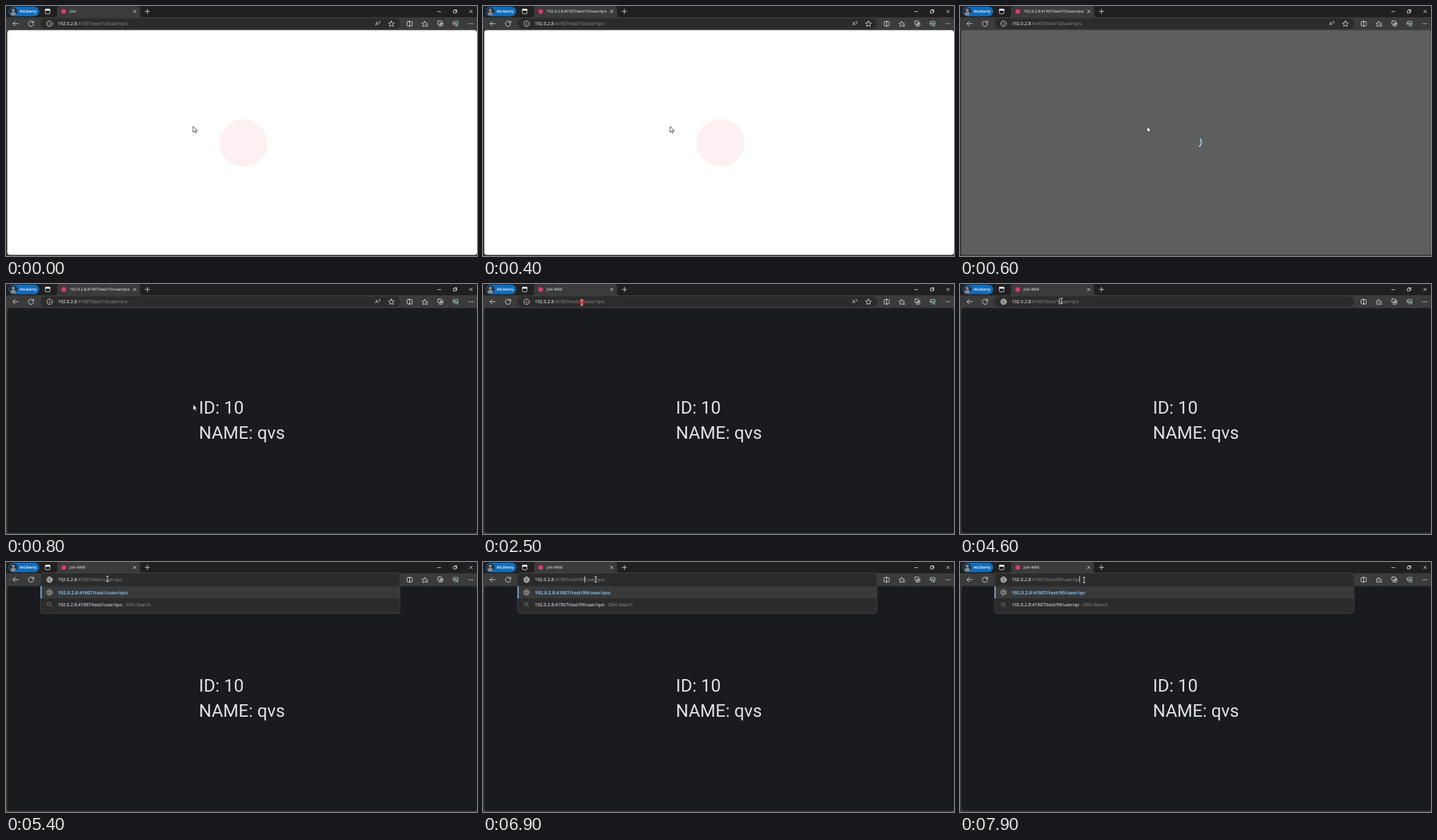
Write an HTML page that moves like this. It is 710 px wide and 378 px high and loops after 8 s.

```html
<!DOCTYPE html>
<html lang="en">
<head>
<meta charset="utf-8">
<style>
  html, body { margin: 0; width: 100%; height: 100%; overflow: hidden; background: #3b3b3b; }
  svg { display: block; width: 100%; height: 100%; }
  text { font-family: "Open Sans", "Noto Sans", sans-serif; fill: #fff; text-rendering: geometricPrecision; white-space: pre; }
  .line { fill: none; stroke: #e4e4e4; stroke-width: .85; stroke-linecap: round; stroke-linejoin: round; }
  .dim { stroke: #a8a8a8; }
  .small { font-size: 5.9px; }
  .url { font-size: 6.85px; }
  .grey { fill: #969696; }
  .big { font: 26.6px Roboto, sans-serif; fill: #e2e2e6; }
</style>
</head>
<body>
<svg viewBox="0 0 710 378">
  <defs>
    <g id="globe" class="line">
      <circle r="4.1"/><ellipse rx="1.8" ry="4.1"/><path d="M-3.8-1.4H3.8M-3.8 1.4H3.8"/>
    </g>
    <path id="star" class="line" d="M0-4.2 1.3-1.4 4.3-1 2.1 1.1 2.7 4.1 0 2.6-2.7 4.1-2.1 1.1-4.3-1-1.3-1.4Z"/>
    <path id="cross" class="line" d="M-2-2 2 2M2-2-2 2"/>
  </defs>

  <!-- Window frame and tab strip -->
  <path fill="#3b3b3b" d="M0 0H710V378H0Z"/>
  <path fill="#202020" d="M0 0H710V17H0Z"/>
  <path fill="#3b3b3b" d="M73 17Q77 17 77 13V4Q77 0 81 0H198Q202 0 202 4V13Q202 17 206 17Z"/>
  <rect x="4" y="1" width="46" height="14.5" rx="7.2" fill="#0f6cbd"/>
  <circle cx="11" cy="8.2" r="6.2" fill="#26313c"/>
  <path fill="#8d8a88" d="M7 13Q7 8.8 11 8.8T15 13Q11 15.6 7 13Z"/>
  <circle cx="11" cy="6.2" r="2.3" fill="#8d8a88"/>
  <text x="20.5" y="10.2" font-size="5.8" font-weight="600">AtLiberty</text>
  <rect class="line" x="59.3" y="4.8" width="7" height="7" rx="1.2"/>
  <path fill="#fff" d="M59 4.5H66.6V7H59Z"/>
  <circle cx="87" cy="8.2" r="3.5" fill="#e0386e"/>
  <text id="title" class="small" x="96" y="10.3"></text>
  <use href="#cross" x="194" y="8.3"/>
  <path class="line" d="M209.8 8.2H216.6M213.2 4.8V11.6M650.7 8.5H655.3"/>
  <path class="line" d="M674.8 6.8H678.4V10.6H674.8ZM676 5.6H679.6V9.4"/>
  <use href="#cross" x="701" y="8.3"/>

  <!-- Toolbar -->
  <path class="line" d="M18.5 26.7H10.7M14 23.2 10.5 26.7 14 30.2"/>
  <path class="line" d="M41.3 25A4 4 0 1 0 41.7 27.3M41.7 22.6V25.3H39"/>
  <rect x="52" y="18.7" width="542" height="16" rx="7" fill="#2b2b2b"/>
  <g id="barIcons">
    <text x="556.5" y="29.3" font-size="7" fill="#b0b0b0">A</text>
    <path class="line dim" d="M561.8 23.5Q563 24.7 561.8 26M563.3 22.6Q565 24.7 563.3 26.8"/>
    <g class="dim"><use href="#star" x="581" y="26.8"/></g>
  </g>
  <rect class="line" x="604.6" y="23.5" width="7.8" height="6.6" rx="1.2"/>
  <path class="line" d="M608.5 22.5V31"/>
  <path class="line" d="M630.5 30.3 628.5 31 629 28 627 26 629.8 25.6 631 23 632.2 25.6 635 26M632 28.2H635.8M632 30.5H635.8"/>
  <rect class="line" x="651" y="22.6" width="5.8" height="5.8" rx="1.2"/>
  <path class="line" d="M658.5 25V28.6Q658.5 30.5 656.5 30.5H653M655.2 25.4V28.6M653.6 27H656.8"/>
  <path class="line" d="M677.7 30.5 674.3 27Q672.8 24.5 675 23.2 676.6 22.7 677.7 24.2 678.8 22.7 680.5 23.2 682.5 24.5 681 27M674 27H676.3L677.3 25.5 678.5 28 679.2 27H681"/>
  <circle cx="680" cy="29.3" r="1.9" fill="#3fa36c"/>
  <g fill="#e4e4e4"><circle cx="697.8" cy="26.8" r=".75"/><circle cx="700.6" cy="26.8" r=".75"/><circle cx="703.4" cy="26.8" r=".75"/></g>

  <!-- Page -->
  <rect id="page" x="2" y="36.6" width="708" height="339.6" rx="4"/>
  <circle id="splash" cx="358" cy="207" r="36" fill="#fdf0f2"/>
  <path id="spinner" d="M361.6 200.2A9 9 0 0 1 360.4 213" fill="none" stroke="#9ecaff" stroke-width="1.8"/>
  <g id="content">
    <text class="big" x="290.8" y="196.2">ID: 10</text>
    <text class="big" x="290.8" y="233.8">NAME: qvs</text>
  </g>

  <!-- Suggestions -->
  <g id="popup">
    <rect x="51" y="17" width="544" height="63" rx="5" fill="#000" opacity=".25"/>
    <rect x="52" y="16.5" width="542" height="61.5" rx="4" fill="#2b2b2b" stroke="#4c4c4c" stroke-width=".8"/>
    <path fill="#393939" d="M52 36.8H594V55H52Z"/>
    <path fill="#6cb2ee" d="M52 36.8H53.8V55H52Z"/>
    <g opacity=".6"><use href="#globe" x="65.6" y="46"/></g>
    <g class="line dim" opacity=".7"><circle cx="64.8" cy="63.8" r="2.6"/><path d="M66.8 65.8 69 68"/></g>
    <text id="match" x="78" y="48.6" font-size="7.1" font-weight="700" style="fill:#7db9ee"></text>
    <text class="url" x="78" y="67.4"><tspan id="query"></tspan><tspan class="grey"> - Zilm Search</tspan></text>
  </g>

  <!-- Address -->
  <use id="globeIcon" href="#globe" x="65.8" y="26.8"/>
  <g id="infoIcon" class="line"><circle cx="65.8" cy="26.8" r="4.1"/><path d="M65.8 26.4V28.8M65.8 24.7V24.8"/></g>
  <rect id="selection" x="78" y="21.5" height="10" fill="#2563a8"/>
  <text id="address" class="url" x="78" y="29.1"><tspan>192.0.2.8</tspan><tspan id="path" class="grey"></tspan></text>
  <rect id="caret" y="21.5" width=".8" height="9.8" fill="#eee"/>

  <!-- Pointer -->
  <g id="pointer">
    <circle id="press" r="4.6" fill="#d32020" opacity=".65"/>
    <path id="arrow" d="M0 0V9L2.1 7.1 3.6 10.2 5 9.5 3.6 6.6H6.3Z" fill="#fff" stroke="#111" stroke-width=".7"/>
    <path id="beam" class="line" d="M-1.6-4H1.6M0-4V4M-1.6 4H1.6"/>
  </g>
</svg>
<script>
const LOOP = 8000, STEP = 100, HOST = '192.0.2.8';
const el = id => document.getElementById(id);
const show = (id, on) => el(id).style.display = on ? '' : 'none';
const urlPath = (id, name) => `:41907/test/${id}/user/${name}`;

// time, id, name, caret position: after the id, at the end, or none
const edits = [
  [0, '10', 'qvs', ''],
  [3800, '10', 'qvs', 'id'],
  [4600, '1', 'qvs', 'id'],
  [4800, '', 'qvs', 'id'],
  [5600, '9', 'qvs', 'id'],
  [5800, '99', 'qvs', 'id'],
  [7300, '99', 'qvs', 'end'],
  [7700, '99', 'qv', 'end'],
];
// time, x, y
const moves = [
  [0, 282, 182], [1400, 282, 182], [2200, 149, 28], [3200, 149, 28],
  [3600, 153, 25.6], [6800, 153, 25.6], [7000, 187, 27.2], [LOOP, 187, 27.2],
];

function pointerAt(t) {
  const i = moves.findIndex(m => m[0] > t);
  const [t0, x0, y0] = moves[i - 1], [t1, x1, y1] = moves[i];
  const p = (t - t0) / (t1 - t0), k = p * p * (3 - 2 * p);
  return [x0 + (x1 - x0) * k, y0 + (y1 - y0) * k];
}

function render(now) {
  const t = Math.floor(now % LOOP / STEP) * STEP;
  const between = (a, b) => t >= a && t < b;

  const [since, id, name, caretAt] = edits.findLast(e => e[0] <= t);
  const path = urlPath(id, name), url = HOST + path;
  el('path').textContent = path;
  el('match').textContent = el('query').textContent = url;
  el('title').textContent = t < 100 ? 'Jolv' : t < 900 ? HOST + urlPath('10', 'qvs') : 'Jolv-Mild';

  el('page').setAttribute('fill', t < 600 ? '#fff' : t < 800 ? '#5d5f5e' : '#1a1b1e');
  show('splash', t < 600);
  show('spinner', between(600, 800));
  show('content', t >= 800);

  const editing = t >= 4600;
  show('barIcons', !editing);
  show('infoIcon', !editing);
  show('globeIcon', editing);
  show('popup', t >= 4700);

  const selected = between(2600, 3800);
  show('selection', selected);
  el('selection').setAttribute('width', el('address').getComputedTextLength());
  el('path').style.fill = selected ? '#fff' : '';

  const caretIndex = caretAt === 'id' ? url.indexOf('/user') : url.length;
  el('caret').setAttribute('x', 78 + el('address').getSubStringLength(0, caretIndex));
  show('caret', caretAt && (t - since) % 1100 < 600);

  const [x, y] = pointerAt(t), overText = y < 35;
  el('pointer').setAttribute('transform', `translate(${x} ${y})`);
  show('arrow', !overText);
  show('beam', overText);
  show('press', between(2400, 2700) || between(3700, 4000) || between(7200, 7500));
}

const start = performance.now();
function loop() {
  render(performance.now() - start);
  requestAnimationFrame(loop);
}
loop();
</script>
</body>
</html>
```
